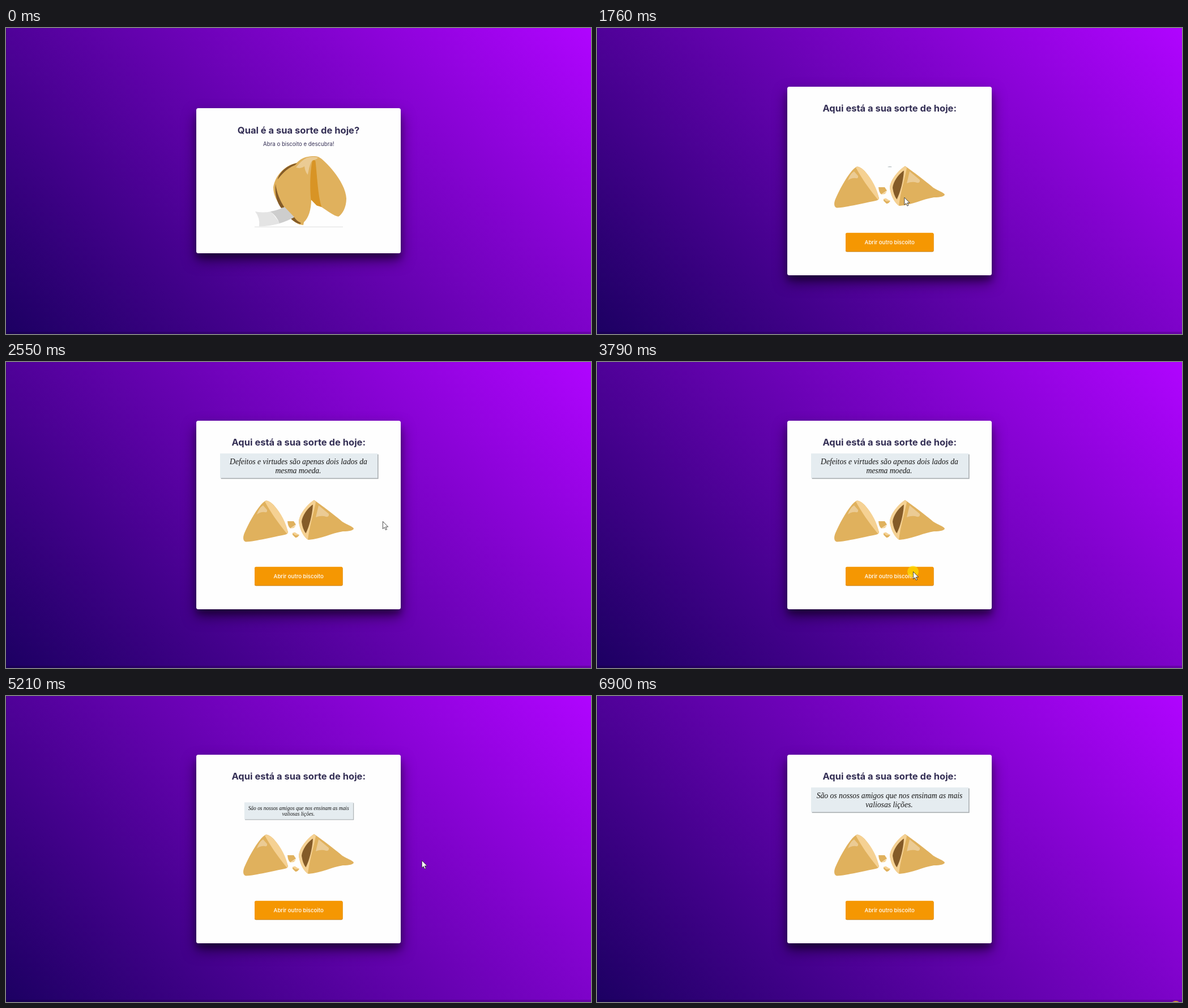
These frames come from a looping animation (1033 px wide and 542 px high, 6.98 s). An HTML page:

```html
<!DOCTYPE html>
<html lang="pt-BR">
<head>
<meta charset="utf-8">
<title>Biscoito da sorte</title>
<style>
  html, body { margin: 0; width: 100%; height: 100%; overflow: hidden; }
  body { position: relative; background: linear-gradient(45deg, #1c0062, #b004ff); }
  body::after {
    content: ""; position: absolute; inset: 0; pointer-events: none;
    box-shadow: inset 1px -4px 0 rgba(0, 0, 0, .16);
  }
  #card {
    position: absolute; left: 336px; width: 361px; border-radius: 3.5px; background: #fefefe;
    box-shadow: 0 12px 24px rgba(0, 0, 0, .55), 0 9px 8px rgba(0, 0, 0, .22);
  }
  svg { position: absolute; left: 0; top: 0; width: 1033px; height: 542px; z-index: 1; }
  text { text-anchor: middle; font-family: Inter, sans-serif; fill: #332e54; }
  .title { font-size: 16.5px; font-weight: 700; }
  .sub { font-size: 9.67px; }
  .label { font-size: 9.6px; font-weight: 500; fill: #fff; }
  .luck text { font: italic 13.65px "Liberation Serif", serif; fill: #151515; }
  .dough { fill: #e0b15d; }
  .light { fill: #f5d193; }
  .shine { fill: #ebcb94; }
  .dark { fill: #845b28; }
</style>
</head>
<body>
<div id="card"></div>
<svg viewBox="0 0 1033 542">
  <g id="closed">
    <text class="title" x="516.5" y="186.5">Qual é a sua sorte de hoje?</text>
    <text class="sub" x="516.8" y="209.3">Abra o biscoito e descubra!</text>
    <g id="cookie">
      <path d="M439 352.4H595" stroke="#ebebeb" stroke-width="1.8"/>
      <path class="dough" d="M513 239C519 234 524 227 545 227C552 227 557 231 562 236C580 253 600 280 601 302C601 318 594 330 587 334C579 333 568 324 557 317L548 314L539 304C539 322 534 337 526 344L525 349L518 348C508 344 500 335 490 320C478 309 472 295 472 282C475 262 492 243 513 239Z"/>
      <path fill="#d89425" d="M540.5 237C536 262 537 290 538.5 304L549 314.5L557.5 317C551 300 549 258 546.5 236Q543.5 231 540.5 237Z"/>
      <path class="shine" d="M512 247Q521 235 531 230Q541 227 551 229.5Q549 233 541 234.5Q536 240 533 260Q528 255 527 245Q521 250 512 247Z"/>
      <path class="dark" d="M514 239.500C498 242 482 255 479.500 268.500C489 256 499 247 510 243Z"/>
      <path class="dark" d="M476 276C474 295 479 310 486 319L491.500 317.500C484 306 478 292 476 276Z"/>
      <path class="dark" d="M503 338Q512 346 520 347L520.500 345Q513 342 509 335Z"/>
      <path fill="#e4e4e4" d="M440 325Q454 328 468 325L484 346Q466 351 447 351.500Q449 337 440 325Z"/>
      <path fill="#cdcdcd" d="M467 325Q482 322 492 317L509 335Q497 342 483 346Q478 333 467 325Z"/>
    </g>
  </g>

  <g id="open">
    <text class="title" x="516.7" y="148.2">Aqui está a sua sorte de hoje:</text>
    <path class="dough" d="M459 245.500C448 250 430 282 421 303C418 310 418 318 424 318.500C440 318 475 309 492 306Q498 305 498 301C490 275 475 252 465 247.500Q462 245 459 245.500Z"/>
    <path class="light" d="M457 247Q463 244 470 251C484 264 495 285 498 302L496 304C483 288 468 268 457 247Z"/>
    <path class="shine" d="M454 254L461 262Q462 267 457 266Q450 265 443 270Q447 258 454 254Z"/>
    <path class="dough" d="M497 282H508L512 288L502 294.500Q498 292 497 282Z"/>
    <path class="light" d="M501 295L512 289L508.500 294Z"/>
    <path class="dough" d="M506 303L518 306Q515 311.500 511 311L506 306Z"/>
    <path class="light" d="M505.500 303L510 301.500L518 306.500L511 307Z"/>
    <path class="dough" d="M544 244.500C530 254 518 270 517 283C519 298 526 310 534 315C558 313 575 303 595 300C606 300 614 298 614 295C612 291 602 288 594 283C580 271 560 256 544 244.500Z"/>
    <path class="light" d="M544 244.500C530 254 518 270 517 283C519 298 526 310 533 315C536 290 543 270 547 248Z"/>
    <path class="dark" d="M542 252.500C533 258 523 272 522 283Q524 297 529.500 303.500C536 290 541 270 542 252.500Z"/>
    <path class="shine" d="M552 254L570 269Q571 275 565 274Q557 271 547 275Z"/>
    <rect x="439" y="363.4" width="155.500" height="33" rx="2.500" fill="#b86f00"/>
    <rect x="439" y="362.700" width="155.500" height="33" rx="2.500" fill="#f59702"/>
    <text class="label" x="516.700" y="382.800">Abrir outro biscoito</text>
    <g id="slip" class="luck">
      <rect x="379.600" y="163.600" width="278" height="43.500" fill="#a9aeb1"/>
      <rect x="378" y="162" width="278" height="43.500" fill="#e5ecf0"/>
      <text id="line1" x="516.500" y="181"></text>
      <text id="line2" x="516" y="196.800"></text>
    </g>
  </g>

  <g id="pointer">
    <circle id="halo" r="10" fill="rgb(255,225,0)" fill-opacity=".68"/>
    <path id="arrow" fill="#fff" stroke="#222" stroke-width=".8" stroke-linejoin="round" d="M.4 .4V13.500L3.300 10.800L5.400 15.400L7.500 14.500L5.400 10H9.700Z"/>
    <path id="hand" fill="#fff" stroke="#222" stroke-width=".9" stroke-linejoin="round" d="M-1.500 1.500Q-.2 -.6 1.200 1.500V6.500Q3 5.500 3.800 7Q5.500 6.200 6.100 7.600Q8 7 8 9V12Q7.500 14 6.500 17H-1Q-2.500 13.500-5.500 10.500Q-5.500 8.500-3.500 9L-1.500 10.800ZM1.200 6.500V9M3.800 7V9.500M6.100 7.600V9.800"/>
  </g>
</svg>

<script>
const LOOP = 6980, GROW = 800;
const $ = id => document.getElementById(id);

// time, x, y of the pointer tip
const path = [
  [0, 952, 545], [70, 951, 538], [170, 951, 538], [870, 595, 369], [1230, 541, 300],
  [1740, 541, 300], [2070, 665, 282], [2830, 665, 282], [3260, 554, 370], [3540, 554, 370],
  [3720, 558, 371], [3860, 558, 371], [4300, 531, 291], [4880, 531, 291], [5200, 734, 291],
  [5260, 733, 290], [6120, 733, 290], [6690, 1022, 550], [LOOP, 1022, 550]
];
const presses = [[1640, 1730], [3760, 3860], [4800, 4886], [6880, LOOP]];
const fortunes = [
  { from: 1730, to: 3860, lines: ["Defeitos e virtudes são apenas dois lados da", "mesma moeda."] },
  { from: 4886, to: LOOP, lines: ["São os nossos amigos que nos ensinam as mais", "valiosas lições."] }
];

function slope(i, k) {
  const a = path[i - 1], b = path[i], c = path[i + 1];
  if (!a || !c || (b[k] - a[k]) * (c[k] - b[k]) <= 0) return 0;
  return (c[k] - a[k]) / (c[0] - a[0]);
}

function pointerAt(t) {
  let i = 0;
  while (i < path.length - 2 && t >= path[i + 1][0]) i++;
  const a = path[i], b = path[i + 1], d = b[0] - a[0], u = (t - a[0]) / d, v = 1 - u;
  return [1, 2].map(k =>
    v * v * (1 + 2 * u) * a[k] + u * u * (3 - 2 * u) * b[k] +
    d * u * v * (v * slope(i, k) - u * slope(i + 1, k)));
}

// CSS "ease": cubic-bezier(.25, .1, .25, 1)
function ease(x) {
  if (x >= 1) return 1;
  const bez = (p, q, u) => 3 * p * u * (1 - u) ** 2 + 3 * q * u * u * (1 - u) + u ** 3;
  let lo = 0, hi = 1;
  for (let n = 0; n < 20; n++) {
    const mid = (lo + hi) / 2;
    if (bez(.25, .25, mid) < x) lo = mid; else hi = mid;
  }
  return bez(.1, 1, lo);
}

function shake(t) {
  return t < 3000 ? .9 * Math.abs(Math.cos((t - 1280) / 130)) : -1.4 * Math.cos((t - 4520) / 130);
}

const show = (id, on) => { $(id).style.display = on ? "" : "none"; };

function draw(t) {
  const luck = fortunes.find(f => t >= f.from && t < f.to);
  const [x, y] = pointerAt(t);
  const hover = !luck && x > 438 && x < 602 && y > 226 && y < 354;

  $("card").style.top = (luck ? 103.8 : 142) + "px";
  $("card").style.height = (luck ? 333.8 : 257.4) + "px";
  show("closed", !luck);
  show("open", !!luck);

  const k = hover ? shake(t) : 0;
  $("cookie").setAttribute("transform", `translate(${k} ${-k})`);

  if (luck) {
    const s = ease((t - luck.from) / GROW);
    $("slip").setAttribute("transform", `translate(517 247.5) scale(${s}) translate(-517 -247.5)`);
    $("line1").textContent = luck.lines[0];
    $("line2").textContent = luck.lines[1];
  }

  $("pointer").setAttribute("transform", `translate(${x} ${y})`);
  show("arrow", !hover);
  show("hand", hover);
  show("halo", presses.some(([a, b]) => t >= a && t < b));
}

const start = performance.now();
function tick() {
  draw((performance.now() - start) % LOOP);
  requestAnimationFrame(tick);
}
tick();
</script>
</body>
</html>
```
